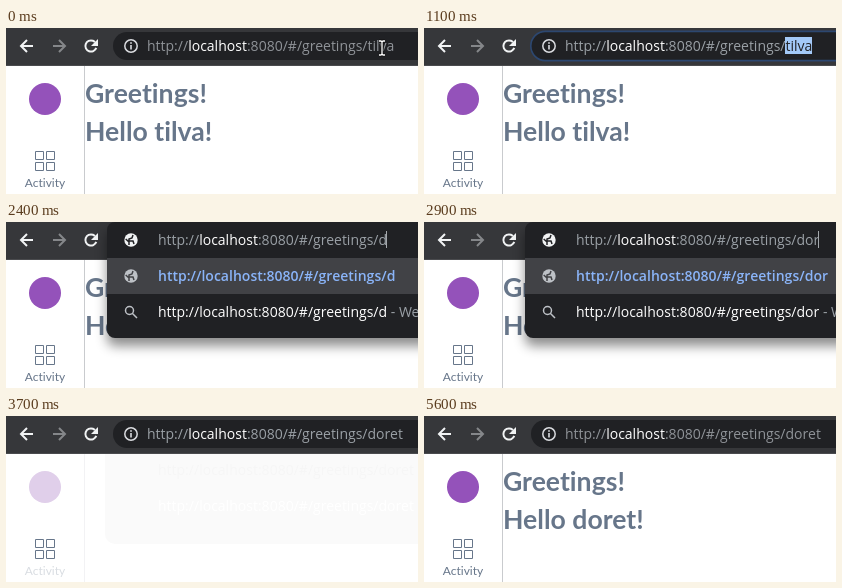
An HTML page with a canvas for the animation above (6600 ms loop, 412 by 166 pixels).

```html
<!DOCTYPE html>
<html lang="en">
<head>
<meta charset="utf-8">
<title>Greetings route</title>
<style>
  html, body { margin: 0; width: 100%; height: 100%; overflow: hidden; background: #fff; }
  canvas { display: block; width: 100vw; height: 100vh; }
</style>
</head>
<body>
<canvas id="stage" width="412" height="166"></canvas>
<script>
const ctx = document.getElementById('stage').getContext('2d');
const LOOP = 6600;
const FIRST = 'tilva', SECOND = 'doret';
const PATH = ':8080/#/greetings/';
const URL_FONT = '14px "Open Sans", "Noto Sans", sans-serif';
const BAR = '#36373a', FIELD = '#202124', SLATE = '#67768a';

// Any non-zero spacing switches ligatures off.
ctx.letterSpacing = '0.01px';

function text(str, x, y, color, font) {
  ctx.font = font;
  ctx.fillStyle = color;
  ctx.fillText(str, x, y);
  return x + ctx.measureText(str).width;
}

function stroke(color, width, build) {
  ctx.strokeStyle = color;
  ctx.lineWidth = width;
  ctx.beginPath();
  build();
  ctx.stroke();
}

function disc(x, y, r, color) {
  ctx.fillStyle = color;
  ctx.beginPath();
  ctx.arc(x, y, r, 0, Math.PI * 2);
  ctx.fill();
}

function rounded(x, y, w, h, radii, color) {
  ctx.fillStyle = color;
  ctx.beginPath();
  ctx.roundRect(x, y, w, h, radii);
  ctx.fill();
}

function line(points) {
  points.forEach(([x, y], i) => i ? ctx.lineTo(x, y) : ctx.moveTo(x, y));
}

function arrow(cx, dir, color) {
  stroke(color, 2, () => {
    line([[cx - 6 * dir, 18], [cx + 6 * dir, 18]]);
    line([[cx, 12], [cx + 6 * dir, 18], [cx, 24]]);
  });
}

function reload() {
  stroke('#f1f3f4', 2, () => ctx.arc(85, 18, 5.6, 0.35, Math.PI * 1.75));
  ctx.fillStyle = '#f1f3f4';
  ctx.beginPath();
  line([[92, 11], [92, 18], [85, 18]]);
  ctx.fill();
}

function infoIcon() {
  stroke('#dadce0', 1.5, () => ctx.arc(125, 18, 6.2, 0, Math.PI * 2));
  ctx.fillStyle = '#dadce0';
  ctx.fillRect(124.2, 17, 1.6, 4.5);
  ctx.fillRect(124.2, 14.2, 1.6, 1.6);
}

function globe(y, color, gap) {
  disc(125, y, 6.7, color);
  stroke(gap, 1.5, () => {
    line([[119.7, y - 1], [123, y + 2], [123, y + 5]]);
    line([[127, y - 5], [126, y - 2], [123, y - 1], [123, y + 1], [127, y + 1], [128, y + 4]]);
  });
}

function magnifier(y) {
  stroke('#bdc1c6', 1.5, () => {
    ctx.arc(123.5, y - 1.5, 4, 0, Math.PI * 2);
    line([[126.5, y + 1.5], [131, y + 6]]);
  });
}

function iBeam(x, y) {
  const shape = () => {
    line([[x - 3, y - 7], [x - 1, y - 7], [x, y - 6], [x, y + 6], [x - 1, y + 7], [x - 3, y + 7]]);
    line([[x + 3, y - 7], [x + 1, y - 7], [x, y - 6]]);
    line([[x, y + 6], [x + 1, y + 7], [x + 3, y + 7]]);
  };
  stroke('#111', 3, shape);
  stroke('#fff', 1.3, shape);
}

function address(x, name, grey, selected) {
  x = text('http://', x, 23, grey, URL_FONT);
  x = text('localhost', x, 23, '#fff', URL_FONT);
  x = text(PATH, x, 23, grey, URL_FONT);
  if (selected) {
    ctx.fillStyle = '#a3c9f7';
    ctx.fillRect(Math.floor(x), 9, Math.ceil(ctx.measureText(name).width), 17);
  }
  return text(name, x, 23, selected ? FIELD : grey, URL_FONT);
}

function page(name, loading) {
  ctx.fillStyle = '#fff';
  ctx.fillRect(0, 0, 412, 166);
  ctx.fillStyle = loading ? '#f2f2f4' : '#c9cbce';
  ctx.fillRect(78, 38, 1, 128);

  disc(39, 71, 16, loading ? '#e0cfea' : '#9452ba');
  stroke(SLATE, 1, () => {
    for (const x of [29.5, 40.5])
      for (const y of [123.5, 134.5]) ctx.rect(x, y, 8, 8);
  });
  ctx.textAlign = 'center';
  text('Activity', 39, 159, loading ? '#d9dde2' : SLATE, '12px Lato, sans-serif');
  ctx.textAlign = 'left';

  if (loading) {
    rounded(99, 38, 330, 90, [0, 0, 0, 10], '#fafafa');
    text('http://localhost' + PATH + name, 152, 59, '#f6f6f6', URL_FONT);
    text('http://localhost' + PATH + name, 152, 95, '#fff', URL_FONT);
  } else {
    const heading = 'bold 26.6px Lato, sans-serif';
    text('Greetings!', 79, 75, SLATE, heading);
    text(`Hello ${name}!`, 79, 113, SLATE, heading);
  }
}

function toolbar(ring) {
  ctx.fillStyle = BAR;
  ctx.fillRect(0, 0, 412, 38);
  ctx.fillStyle = '#4a4b4e';
  ctx.fillRect(0, 37, 412, 1);
  arrow(21, -1, '#f1f3f4');
  arrow(53, 1, '#85878a');
  reload();
  rounded(107, 4, 340, 28, 14, FIELD);
  if (ring) {
    ctx.globalAlpha = ring;
    stroke('#2c4770', 1.6, () => ctx.roundRect(106.8, 3.4, 340, 29.2, 14.6));
    ctx.globalAlpha = 1;
  }
}

function popup(name) {
  const url = 'http://localhost' + PATH + name;
  ctx.save();
  ctx.shadowColor = 'rgba(0,0,0,.45)';
  ctx.shadowBlur = 12;
  ctx.shadowOffsetY = 8;
  rounded(101, 0, 340, 116, 8, FIELD);
  ctx.restore();
  ctx.fillStyle = '#414246';
  ctx.fillRect(101, 36, 311, 36);
  globe(54, '#bdc1c6', '#414246');
  text(url, 152, 59, '#8ab4f8', '600 ' + URL_FONT);
  magnifier(90);
  const end = text(url, 152, 95, '#fff', URL_FONT);
  text(' - Web Search', end, 95, '#9aa0a6', URL_FONT);
}

// Grey parts of the address brighten in two steps and dim again at the end.
function addressGrey(t) {
  if (t < 100 || t >= 5600) return '#8f9398';
  if (t < 200 || t >= 5500) return '#959a9f';
  return '#9aa0a6';
}

function typed(t) {
  const count = t < 2500 ? 1 : t < 2900 ? 2 : t < 3000 ? 3 : 5;
  return SECOND.slice(0, count);
}

function draw(t) {
  const typing = t >= 2300 && t < 3700;
  const selected = t >= 500 && t < 2300;
  const grey = addressGrey(t);

  page(t < 3700 ? FIRST : SECOND, t >= 3700 && t < 4200);
  toolbar(selected ? (t < 600 ? 0.5 : 1) : 0);

  if (typing) {
    const name = typed(t);
    if (t >= 2400) popup(name);
    globe(18, '#f1f3f4', FIELD);
    const end = address(152, name, grey, false);
    if (t < 3500) {
      ctx.fillStyle = '#a4a8ac';
      ctx.fillRect(Math.floor(end) - 1, 9, 1, 17);
    }
  } else {
    infoIcon();
    address(141, t < 2300 ? FIRST : SECOND, grey, selected);
  }

  if (t < 600) iBeam(376, 20);
  else if (t < 1000) iBeam(378, 28);
  else if (t < 1100) iBeam(390, 34);
}

const start = performance.now();
function tick() {
  draw((performance.now() - start) % LOOP);
  requestAnimationFrame(tick);
}
tick();
</script>
</body>
</html>
```
